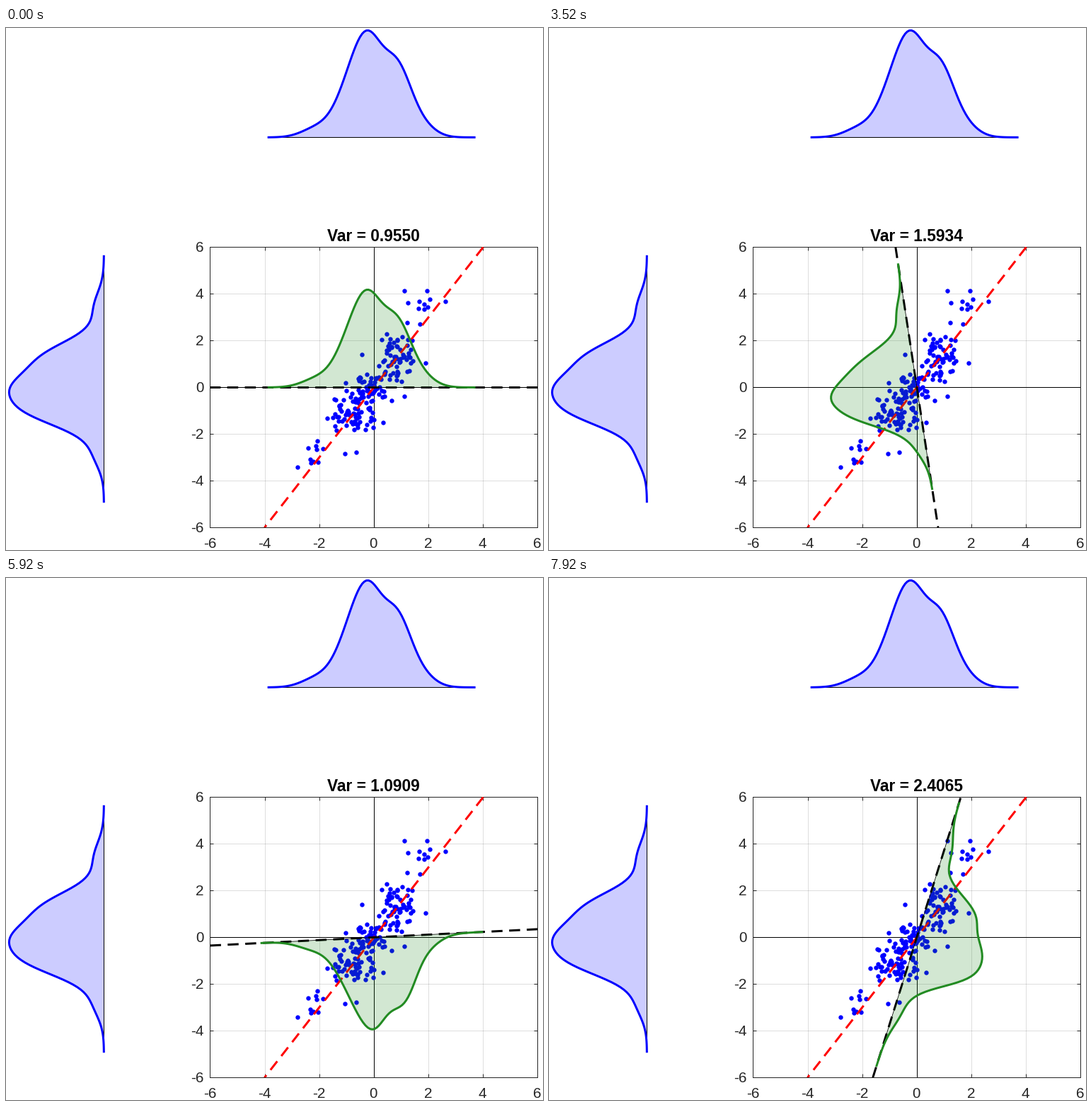
A matplotlib script for the animation above (8000 ms loop, 759 by 737 pixels).

```python
import numpy as np
import matplotlib.pyplot as plt
from matplotlib.animation import FuncAnimation

W, H = 759, 737
LEFT, RIGHT, TOP, BOTTOM = 288.4, 751.4, 309.4, 705.4
LIM = 6
UNIT_X = (RIGHT - LEFT) / (2 * LIM)
UNIT_Y = (BOTTOM - TOP) / (2 * LIM)
MID_X, MID_Y = (LEFT + RIGHT) / 2, (TOP + BOTTOM) / 2
BASE_X, BASE_Y = 138.4, 154.4    # baselines of the left and top curves

FRAMES, INTERVAL = 100, 80
HOLD, STEP = 10, 0.05            # frames at rest, radians per frame

COV = np.array([[0.95504, 1.13805], [1.13805, 1.89993]])
PEAK = 4.18                      # height of the rotating curve at rest
SAMPLES = 200

GREEN = (34 / 255, 139 / 255, 34 / 255)
PALE_BLUE = (0.8, 0.8, 1)
INK = (0.15, 0.15, 0.15)
DASHED = dict(lw=3, ls=(0, (5.17, 3.13)), dash_capstyle="butt")

plt.rcParams["font.family"] = "Liberation Sans"

# Gaussian clusters along the main axis: share, centre, spread
SHARE = np.array([0.044, 0.371, 0.22, 0.317, 0.048])
CENTRE = np.array([(-2.1, -2.8), (-0.66, -0.98), (-0.1, 0.08),
                   (0.85, 1.25), (1.75, 3.4)])
SPREAD = np.array([(0.42, 0.42), (0.51, 0.55), (0.325, 0.37),
                   (0.38, 0.59), (0.355, 0.49)])

# Samples on the rim of the cloud; they set how far each curve reaches
RIM = np.array([(-2.8, -3.4), (-2.42, -2.6), (-1.07, -2.83), (-0.65, -2.78),
                (0.35, -1.5), (0.65, -0.55), (1.12, -0.38), (1.9, 1.05),
                (2.63, 3.67), (1.67, 3.68), (1.12, 4.12), (0.47, 2.3),
                (-0.45, 1.4), (-1.03, 0.2), (-1.72, -1.33)])


def make_samples():
    rng = np.random.default_rng(7)
    parts = [RIM]
    counts = np.round(SHARE * (SAMPLES - len(RIM))).astype(int)
    for n, centre, spread in zip(counts, CENTRE, SPREAD):
        z = 1.8 * np.tanh(rng.normal(size=(n, 2)) / 1.6)
        parts.append(centre + spread * z)
    return np.vstack(parts)


def direction(angle):
    return np.array([np.cos(angle), np.sin(angle)])


def variance(angle):
    u = direction(angle)
    return u @ COV @ u


def density(angle):
    """Smoothed density of the cloud projected onto a direction."""
    u = direction(angle)
    width = 0.36 * np.sqrt(variance(angle))
    reach = RIM @ u
    t = np.linspace(reach.min() - 3 * width, reach.max() + 3 * width, 100)
    sd = np.sqrt(SPREAD ** 2 @ u ** 2 + width ** 2)
    z = (t[:, None] - CENTRE @ u) / sd
    return t, np.exp(-z * z / 2) @ (SHARE / sd)


def box_line(angle):
    """Line through the centre, from edge to edge of the plot box."""
    u = direction(angle)
    end = LIM * u / np.abs(u).max()
    return [end[0], -end[0]], [end[1], -end[1]]


fig = plt.figure(figsize=(W / 72, H / 72), dpi=72, facecolor="white")

# Stage in pixels: marginal curves and labels
stage = fig.add_axes([0, 0, 1, 1])
stage.set(xlim=(0, W), ylim=(H, 0))
stage.axis("off")

t, d = density(0)
scale = PEAK / d.max()
x, y = MID_X + t * UNIT_X, BASE_Y - 151 * d / d.max()
stage.fill_between(x, BASE_Y, y, color=PALE_BLUE, lw=0)
stage.plot(x[[0, -1]], [BASE_Y, BASE_Y], color="black", lw=1)
stage.plot(x, y, color="blue", lw=3)

t, d = density(np.pi / 2)
x, y = BASE_X - 134 * d / d.max(), MID_Y - t * UNIT_Y
stage.fill_betweenx(y, BASE_X, x, color=PALE_BLUE, lw=0)
stage.plot([BASE_X, BASE_X], y[[0, -1]], color="black", lw=1)
stage.plot(x, y, color="blue", lw=3)

ticks = range(-LIM, LIM + 1, 2)
for v in ticks:
    stage.text(MID_X + v * UNIT_X - 0.5, 734, str(v), size=20.7, color=INK,
               ha="center", va="baseline")
    stage.text(279.5, MID_Y - v * UNIT_Y + 6.8, str(v), size=20.7, color=INK,
               ha="right", va="baseline")
title = stage.text(MID_X - 0.5, 301, "", size=22.8, weight="bold",
                   ha="center", va="baseline")

# Scatter plot
ax = fig.add_axes([LEFT / W, 1 - BOTTOM / H, (RIGHT - LEFT) / W, (BOTTOM - TOP) / H])
ax.set(xlim=(-LIM, LIM), ylim=(-LIM, LIM), xticks=ticks, yticks=ticks)
ax.tick_params(direction="in", top=True, right=True, length=5, width=1,
               color=INK, labelbottom=False, labelleft=False)
ax.grid(color=INK, alpha=0.15, lw=1)
ax.set_axisbelow(True)
for side in ax.spines.values():
    side.set(color=INK, linewidth=1)

ax.axhline(0, color="black", lw=1, zorder=2)
ax.axvline(0, color="black", lw=1, zorder=2)
ax.plot(*make_samples().T, "o", color="blue", ms=6.4, mew=0, zorder=3)

main_axis = 0.5 * np.arctan2(2 * COV[0, 1], COV[0, 0] - COV[1, 1])
ax.plot(*box_line(main_axis), color="red", zorder=4, **DASHED)
axis_line, = ax.plot([], [], color="black", zorder=5, **DASHED)
area, = ax.fill([0, 0, 0], [0, 0, 0], color=GREEN, alpha=0.2, lw=0, zorder=6)
base, = ax.plot([], [], color="black", lw=0.8, zorder=6)
curve, = ax.plot([], [], color=GREEN, lw=3, zorder=7)


def draw(k):
    angle = STEP * max(0, k - HOLD)
    t, d = density(angle)
    line = np.outer(t, direction(angle))
    rim = line + np.outer(scale * d, direction(angle + np.pi / 2))

    axis_line.set_data(*box_line(angle))
    base.set_data(*line[[0, -1]].T)
    area.set_xy(np.vstack([line[0], rim, line[-1]]))
    curve.set_data(*rim.T)
    title.set_text(f"Var = {variance(angle):.4f}")
    return axis_line, base, area, curve, title


anim = FuncAnimation(fig, draw, frames=FRAMES, interval=INTERVAL,
                     repeat=True, repeat_delay=0, blit=False)
plt.show()
```
